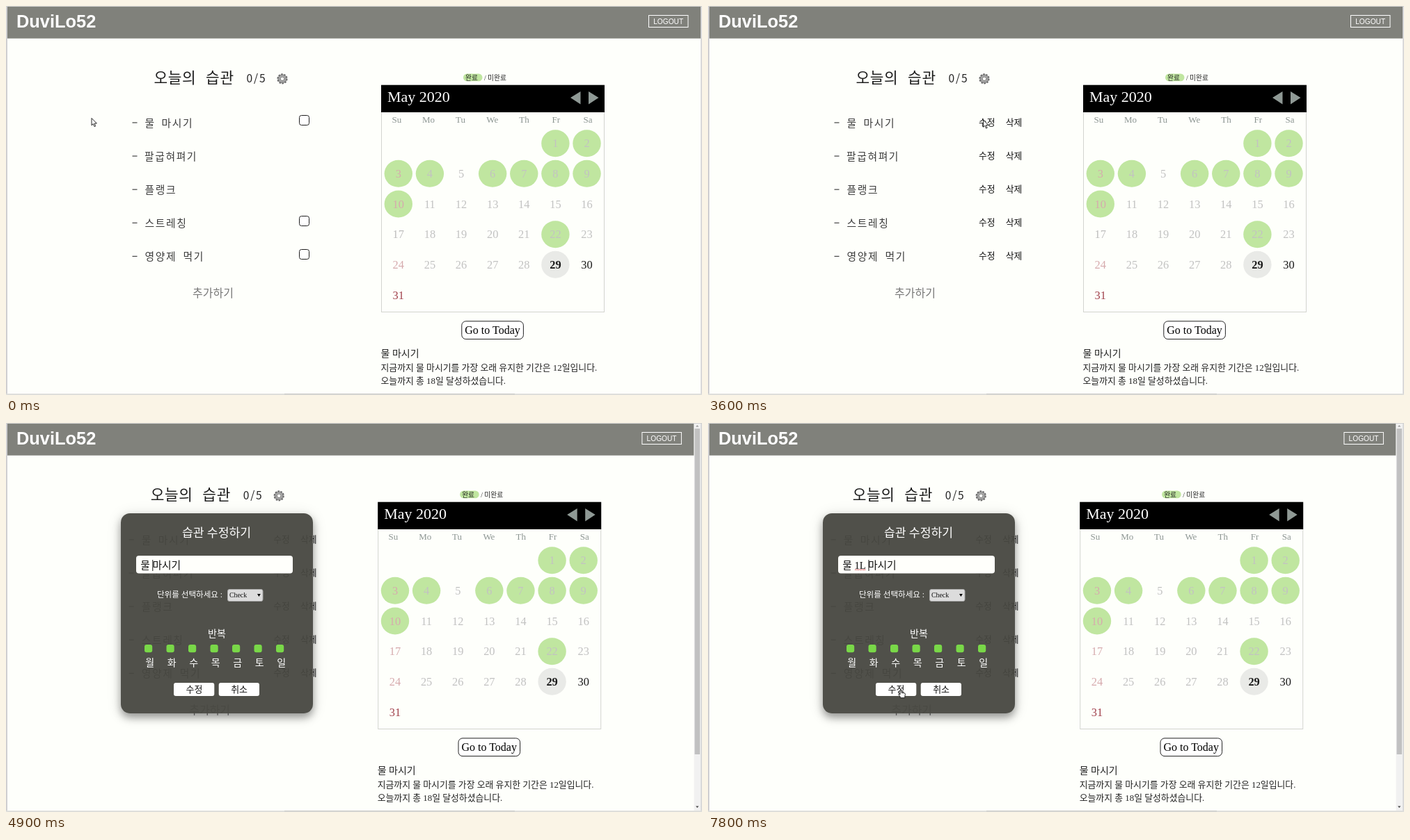
An HTML page that plays this animation: 1000x560 px, repeating every 8000 ms.

```html
<!DOCTYPE html>
<html lang="ko">
<head>
<meta charset="utf-8">
<title>Habit tracker</title>
<style>
  html, body { margin: 0; width: 100%; height: 100%; overflow: hidden; background: #fefffb; }
  #stage { position: relative; width: 1000px; height: 560px; overflow: hidden; }
  svg { position: absolute; left: 0; top: 0; }
  text { font-family: "Liberation Serif", "Noto Sans CJK KR", "Noto Sans CJK JP", "Noto Sans CJK", serif; white-space: pre; }
  .hand { font-family: "Noto Sans CJK KR", "Noto Sans CJK JP", "Noto Sans CJK", sans-serif; font-weight: 300; }
  .sans { font-family: "Liberation Sans", sans-serif; }
  #panel {
    position: absolute; left: 164.5px; top: 130px; width: 276px; height: 288px;
    border-radius: 13px; background: rgba(71, 71, 65, .95);
    box-shadow: 0 6px 12px rgba(0, 0, 0, .36), 0 3px 22px rgba(0, 0, 0, .12);
  }
</style>
</head>
<body>
<div id="stage">
  <svg id="page" width="1000" height="560"></svg>
  <div id="panel"></div>
  <svg id="top" width="1000" height="560"></svg>
</div>
<script>
const $ = id => document.getElementById(id);

function add(parent, tag, attrs) {
  const el = document.createElementNS('http://www.w3.org/2000/svg', tag);
  for (const k in attrs) el.setAttribute(k, attrs[k]);
  return parent.appendChild(el);
}
const group = parent => add(parent, 'g', {});
const rect = (p, x, y, width, height, fill, more) => add(p, 'rect', { x, y, width, height, fill, ...more });
const path = (p, d, fill, more) => add(p, 'path', { d, fill, ...more });
function text(p, str, x, y, size, fill, more) {
  const el = add(p, 'text', { x, y, 'font-size': size, fill, ...more });
  el.textContent = str;
  return el;
}
const mid = { 'text-anchor': 'middle' };
const show = (el, on) => { el.style.display = on ? '' : 'none'; };

// Window and header
const page = $('page');
rect(page, 0, 0, 1000, 560, '#fefffb');
const bar = rect(page, 2, 1, 996, 45.7, '#80817b');
text(page, 'DuviLo52', 15, 31, 25.4, '#fff', { class: 'sans', 'font-weight': 700 });
const logout = group(page);
rect(logout, 923.5, 13.5, 56.5, 17, 'none', { stroke: '#fff' });
text(logout, 'LOGOUT', 951.7, 25.8, 10.2, '#fff', { ...mid, class: 'sans' });

const body = group(page);

// Habit list
const hand = (str, x, y, size, fill, gap, more) =>
  text(body, str, x, y, size, fill, { class: 'hand', 'letter-spacing': gap, ...more });
hand('오늘의', 212.5, 110.5, 21.4, '#1c1c1c', 0.6, { style: 'font-weight:400' });
hand('습관', 287, 110.5, 21.4, '#1c1c1c', 0.8, { style: 'font-weight:400' });
hand('0/5', 345.5, 110, 15.6, '#222', 1.8);

const gear = add(body, 'g', { transform: 'translate(397 104.8)', fill: 'none' });
const ring = (r, stroke, w, more) => add(gear, 'circle', { r, stroke, 'stroke-width': w, ...more });
ring(6.6, '#6a6a6a', 2, { 'stroke-dasharray': '2.6 1.55' });
ring(4.5, '#a2a2a2', 2.6);
ring(5.9, '#6a6a6a', 0.8);
ring(2.8, '#666', 0.9);

const rowY = i => 173 + i * 48.1;
const habits = [['물', 199.5, '마시기', 223.5], ['팔굽혀펴기', 199], ['플랭크', 199.5],
  ['스트레칭', 199.5], ['영양제', 199.5, '먹기', 254.5]];
const checks = group(body), edits = group(body);
habits.forEach((words, i) => {
  const y = rowY(i);
  rect(body, 181.5, y - 5.6, 7, 1.1, '#333');
  for (let k = 0; k < words.length; k += 2) hand(words[k], words[k + 1], y + 0.5, 14.8, '#3c3c3c', 1.6);
  if (i < 1 || i > 2)
    rect(checks, 421.5, Math.ceil(y) - 15.5, 14, 14, '#fff', { rx: 3, stroke: '#1e1e1e' });
  text(edits, '수정', 389, y - 1, 12.8, '#111');
  text(edits, '삭제', 427.7, y - 1, 12.8, '#111');
});
text(body, '추가하기', 268, 418.5, 16, '#777');

// Calendar
rect(body, 657, 97.5, 27.5, 10.8, '#c0e6a0', { rx: 5.4 });
text(body, '완료', 660, 106.6, 9.7, '#222');
text(body, '/ 미완료', 687, 106.6, 9.7, '#222');
rect(body, 539.5, 114.5, 320, 326, '#fefffb', { stroke: '#d3d4d0' });
rect(body, 539, 113.7, 321, 39.3, '#000');
text(body, 'May 2020', 548, 137.7, 22, '#fff');
path(body, 'M811 132L825.5 123V141.5ZM837 123L851.5 132L837 141.5Z', '#8f9995');
['Su', 'Mo', 'Tu', 'We', 'Th', 'Fr', 'Sa'].forEach((d, i) =>
  text(body, d, 561.3 + i * 45.8, 168, 13, '#8c9592', mid));

const done = [1, 2, 3, 4, 6, 7, 8, 9, 10, 22];
const dayText = [];
for (let d = 1; d <= 31; d++) {
  const col = (d + 4) % 7, row = Math.floor((d + 4) / 7);
  const cx = 563.8 + col * 45.12, cy = 198 + row * 43.65;
  const dot = done.includes(d) ? '#c0e6a0' : d === 29 ? '#e9eae7' : null;
  if (dot) add(body, 'ellipse', { cx, cy: cy - 0.3, rx: 20.2, ry: 19.5, fill: dot });
  let fill = col ? '#c2c2c2' : '#d6aaad';
  if (d > 28) fill = col ? '#1a1a1a' : '#a1404b';
  dayText[d] = text(body, d, cx, cy + 5.3, 16.4, fill, { ...mid, 'font-weight': d === 29 ? 700 : 400 });
}

rect(body, 654.8, 453.8, 88.6, 25.8, '#fff', { rx: 6, stroke: '#222' });
text(body, 'Go to Today', 699, 472, 16, '#000', mid);
text(body, '물 마시기', 538.5, 505, 14, '#222');
text(body, '지금까지 물 마시기를 가장 오래 유지한 기간은 12일입니다.', 538.5, 525, 12.86, '#222');
text(body, '오늘까지 총 18일 달성하셨습니다.', 538.5, 544.3, 12.86, '#222');

// Scrollbar and window edges
const scroll = group(page);
rect(scroll, 988.5, 1, 9.5, 557, '#f1f1f1');
rect(scroll, 989.5, 8, 7.5, 469, '#c1c1c1');
path(scroll, 'M991 5.5L993.2 3L995.4 5.5Z', '#999');
path(scroll, 'M991 551.5H995.4L993.2 554Z', '#444');
rect(page, 0, 0, 2, 560, '#cfcfd1');
rect(page, 998, 0, 2, 560, '#d9d9d9');
rect(page, 0, 0, 1000, 1, '#d2d2d0');
rect(page, 0, 558, 1000, 2, '#dededb');
rect(page, 400, 558, 331, 1, '#c4c4c1');

// Dialog
const dialog = group($('top'));
text(dialog, '습관 수정하기', 302.5, 164, 17.2, '#fff', mid);
rect(dialog, 187, 191, 225, 25.5, '#fffffb', { rx: 4 });
const field = text(dialog, '', 193.2, 210, 14.75, '#111');
const caret = rect(dialog, 210, 197, 1, 16, '#111');
const squiggle = path(dialog, 'M211 212' + 'l1.3 -1.4l1.3 1.4'.repeat(6), 'none',
  { stroke: '#d8434b', 'stroke-width': 0.8 });
text(dialog, '단위를 선택하세요 :', 217, 251, 11.55, '#fff');
rect(dialog, 318.5, 239.5, 50.5, 17, '#dcdcdc', { rx: 2.5, stroke: '#a8a8a8' });
text(dialog, 'Check', 321, 251.3, 9.8, '#111');
path(dialog, 'M361 246H365.8L363.4 250Z', '#000');
text(dialog, '반복', 303, 308, 14, '#fff', mid);
[...'월화수목금토일'].forEach((d, i) => {
  const x = 204.6 + i * 31.5;
  rect(dialog, x - 5.6, 319, 11.2, 11.2, '#79d848', { rx: 3 });
  text(dialog, d, x + 2, 349.7, 14, '#fff', mid);
});
[['수정', 241], ['취소', 305.7]].forEach(([label, x]) => {
  rect(dialog, x, 374, 58.3, 19, '#fff', { rx: 3 });
  text(dialog, label, x + 29.4, 388.2, 13, '#111', mid);
});

// Pointer shapes, hot spot at 0,0
const pointer = group($('top'));
const ink = { stroke: '#111', 'stroke-width': 0.9, 'stroke-linejoin': 'round' };
const shapes = {
  arrow: path(pointer, 'M.5 .5V10.8L2.8 8.6L4.5 12.6L6.2 11.9L4.5 8H7.9Z', '#fff', ink),
  hand: path(pointer, 'M-1 .8Q0 -.1 1 .8V4.2L5 4.8Q6.6 5 6.4 6.8L5.8 9.6V11.7H-.8V10L-3.4 7Q-3.2 5.4 -1 7Z', '#fff', ink),
  beam: path(pointer, 'M-2.5 -6.5H2.5M0 -6.5V6.5M-2.5 6.5H2.5', 'none', { stroke: '#222' })
};

// time, x, y, shape from this time on
const track = [
  [0, 122.5, 161, 'arrow'], [100, 122.5, 161, 'arrow'], [700, 397.5, 109, 'arrow'],
  [1000, 397, 109, 'hand'], [1300, 397, 109, 'arrow'], [1600, 295, 136, 'arrow'],
  [1700, 295, 136, 'arrow'], [1900, 394.2, 104, 'hand'], [2600, 394.2, 104, 'arrow'],
  [2900, 390, 132, 'arrow'], [3100, 395, 163.5, 'hand'], [3600, 395, 163.5, 'arrow'],
  [3900, 395, 164.5, 'arrow'], [4300, 318, 188, 'beam'], [4700, 208.5, 215, 'beam'],
  [4800, 210, 205, ''], [6900, 207.5, 229, 'arrow'], [7000, 207.5, 231, 'arrow'],
  [7700, 277, 384, 'hand'], [8000, 277, 384, 'hand']
];
// time, typed text, caret x
const typing = [[0, '', 210.3], [5400, '1', 217.7], [5900, '1L', 226.7], [6400, '1L ', 230.5]];
const TICK = 100, LOOP = 8000, OPEN = 3700;

function movePointer(t) {
  const i = track.findLastIndex(k => k[0] <= t);
  const [t0, x0, y0, shape] = track[i], [t1, x1, y1] = track[i + 1];
  const u = (t - t0) / (t1 - t0), e = u * u * (3 - 2 * u);
  pointer.setAttribute('transform', `translate(${x0 + (x1 - x0) * e} ${y0 + (y1 - y0) * e})`);
  for (const k in shapes) show(shapes[k], k === shape);
}

function draw(t) {
  const open = t >= OPEN, editing = t >= 2400;
  show(checks, !editing);
  show(edits, editing);
  show(dialog, open);
  show($('panel'), open);
  show(scroll, open);
  bar.setAttribute('width', open ? 986.5 : 996);
  body.setAttribute('transform', `translate(${open ? -4.8 : 0} 0)`);
  logout.setAttribute('transform', `translate(${open ? -9.6 : 0} 0)`);
  dayText[17].setAttribute('fill', open ? '#d6aaad' : '#bcbcbc');

  const [, typed, x] = typing.findLast(k => k[0] <= t);
  field.textContent = '물 ' + typed + '마시기';
  caret.setAttribute('x', x);
  show(caret, t >= 4900 && !(t >= 7000 && t < 7500));
  show(squiggle, t >= 6500);
  movePointer(t);
}

const start = performance.now();
function frame() {
  const t = (performance.now() - start) % LOOP;
  draw(Math.floor(t / TICK) * TICK);
  requestAnimationFrame(frame);
}
draw(0);
requestAnimationFrame(frame);
</script>
</body>
</html>
```
